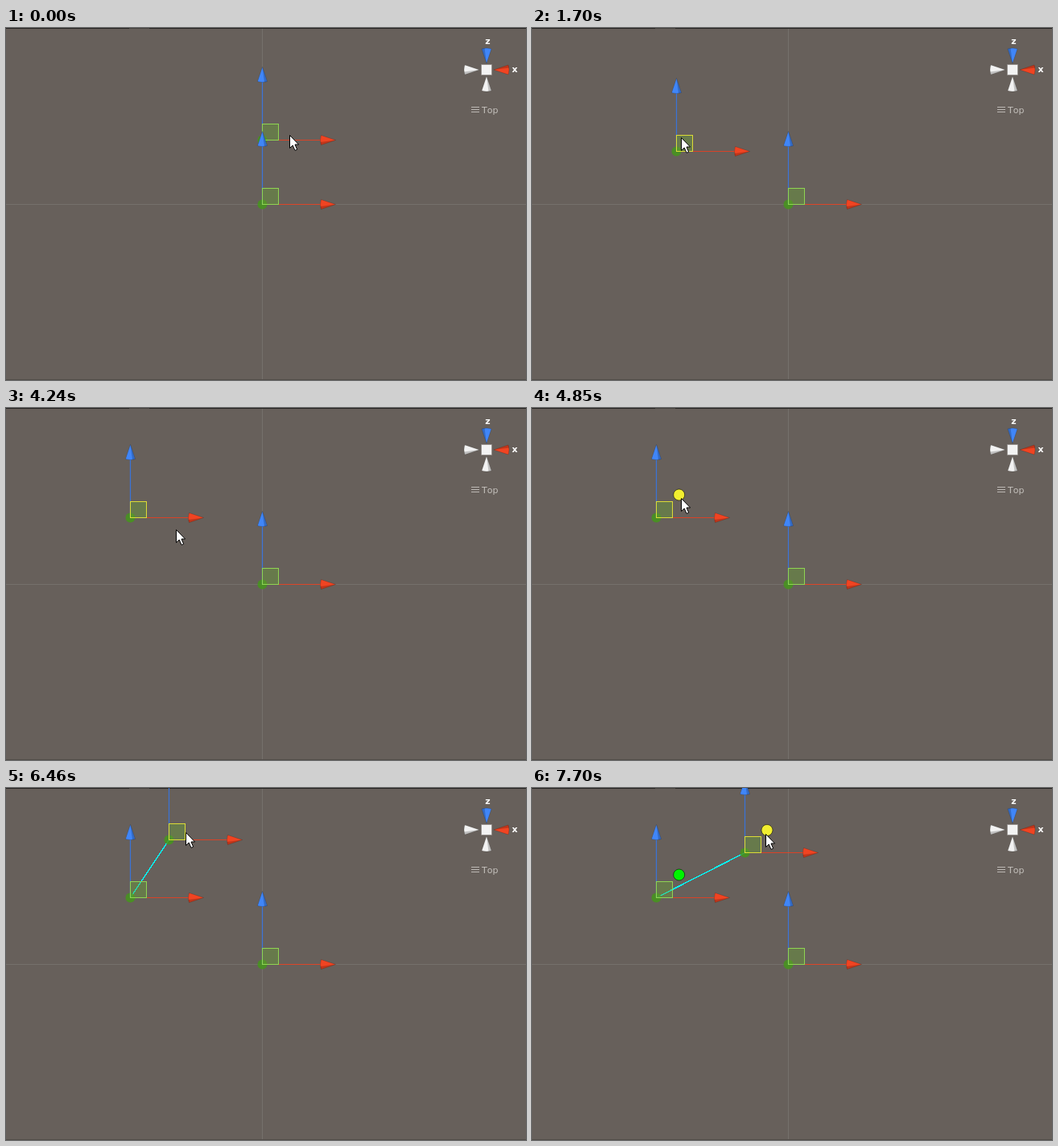
An HTML page that plays this animation: 646x438 px, repeating every 8 s.

```html
<!DOCTYPE html>
<html lang="en">
<head>
<meta charset="utf-8">
<title>Scene handles</title>
<style>
  html, body { margin: 0; width: 646px; height: 438px; overflow: hidden; background: #67605b; }
  svg { display: block; }
  text { font: 11px "DejaVu Sans", Verdana, sans-serif; font-kerning: none; }
  .crisp { shape-rendering: crispEdges; }
  .label { font-weight: bold; fill: #fff; text-anchor: middle; }
  .handle { color: #8fd552; }
  .handle.active { color: #dcdc36; }
  .blue { color: #4086f8; }
  .red { color: #f04422; }
  .white { color: #f2f2f2; }
</style>
</head>
<body>
<svg width="646" height="438" viewBox="0 0 646 438">
  <defs>
    <!-- cone pointing up, tip at the origin -->
    <g id="cone">
      <path d="M0 0L-6 18Q0 20 6 18Z" fill="currentColor"/>
      <path d="M0 0L2.5 19Q5 18.6 6 18Z" opacity=".2"/>
      <path d="M0 0L-6 18Q0 20 6 18Z" fill="none" stroke="#000" stroke-opacity=".25" stroke-width=".6"/>
    </g>
    <g id="handle">
      <circle r="6" fill="#45961c" opacity=".85"/>
      <path d="M0 0H73" stroke="#ee3f1e" stroke-width="1.2" opacity=".85"/>
      <path d="M0 0V-73" stroke="#3377ee" stroke-width="1.2" opacity=".85"/>
      <rect class="crisp" y="-20" width="20" height="20" fill="#66a032" fill-opacity=".4" stroke="currentColor"/>
      <use href="#cone" class="blue" transform="translate(0 -91)"/>
      <use href="#cone" class="red" transform="translate(91 0) rotate(90)"/>
    </g>
  </defs>

  <rect width="646" height="438" fill="#67605b"/>
  <g class="crisp">
    <path d="M0 219.5H646M318.5 0V438" stroke="#75706b"/>
    <path d="M0 .5H646" stroke="#262422"/>
    <path d="M153 .5H178" stroke="#45413e"/>
    <path d="M0 437.5H646" stroke="#524d49"/>
  </g>

  <g id="view">
    <use href="#cone" class="blue" transform="translate(597 44) rotate(180)"/>
    <use href="#cone" class="red" transform="translate(606 52) rotate(-90)"/>
    <use href="#cone" class="white" transform="translate(588 52) rotate(90)"/>
    <use href="#cone" class="white" transform="translate(597 60)"/>
    <rect x="590.5" y="45.5" width="13" height="13" fill="#f3f3f3" stroke="#8d8884" stroke-width=".7"/>
    <text class="label" x="598.5" y="20">z</text>
    <text class="label" x="632" y="55">x</text>
    <path class="crisp" d="M578 98.5h10m-10 3h10m-10 3h10" stroke="#bdb9b5"/>
    <text x="591" y="106" fill="#c4c0bc">Top</text>
  </g>

  <path id="link" class="crisp" stroke="#0ff" stroke-width="1.5"/>
  <use id="b" class="handle" href="#handle"/>
  <use class="handle" href="#handle" transform="translate(318.5 219.5)"/>
  <use id="c" class="handle" href="#handle"/>
  <g stroke="#000" stroke-opacity=".55">
    <circle id="knobB" cx="182.7" cy="108" r="7"/>
    <circle id="knobC" cx="292" cy="52.5" r="7" fill="#f2ee30"/>
  </g>
  <path id="cursor" d="M.5 .5V16.5L4.2 13L7 19.4L9.7 18.2L7 12H11.6Z" fill="#fff" stroke="#000"/>
</svg>
<script>
  const LOOP = 8000, TICK = 88;
  const el = id => document.getElementById(id);
  const [b, c, link, knobB, knobC, cursor] = ["b", "c", "link", "knobB", "knobC", "cursor"].map(el);

  // All times below are ticks, the rate at which the picture refreshes.
  const ramp = (n, from, to) => Math.min(Math.max((n - from) / (to - from), 0), 1);
  const arc = (n, from, to) => Math.sin(Math.PI * ramp(n, from, to));
  const slide = (n, from, to, dx, dy) => [dx, dy].map(d => d * ramp(n, from, to));
  const sum = (...vectors) => [0, 1].map(i => vectors.reduce((total, v) => total + v[i], 0));

  const dragB = n => sum(
    slide(n, 6, 14, -122, 25), [0, -27 * arc(n, 6, 14)],
    slide(n, 17, 22, -42, -28));

  const dragC = n => sum(slide(n, 69, 78, 109, 21), slide(n, 78, 82, 1, 4));

  // The pointer leads whatever it drags by half a tick.
  const pointer = n => sum(
    [352, 133],
    slide(n, 0, 2, -24, -8),
    dragB(n + .5),
    slide(n, 24, 28, 50, 40),
    slide(n, 47, 51, -12, -46),
    slide(n, 52, 55, -17, -4),
    slide(n, 56, 65, -4, -43), [0, 58 * arc(n, 56, 65)],
    slide(n, 65, 68, -13, -25),
    dragC(n + .5),
    slide(n, 81, 87, 12, -12));

  const show = (node, on) => { node.style.display = on ? "" : "none"; };

  function move(node, point, shift = 0) {
    const [x, y] = point.map(v => Math.round(v) + shift);
    node.setAttribute("transform", `translate(${x} ${y})`);
    return `${x} ${y}`;
  }

  function draw(n) {
    const linked = n >= 57, done = n >= 84;
    const start = move(b, sum([318, 139], dragB(n)), .5);
    const end = move(c, sum([154, 55], dragC(n)), .5);
    move(cursor, pointer(n));
    link.setAttribute("d", `M${start}L${end}`);

    b.classList.toggle("active", n >= 7 && !linked);
    c.classList.toggle("active", n >= 70);
    show(c, linked);
    show(link, linked);
    show(knobB, n >= 50 && !linked || done);
    show(knobC, done);
    knobB.setAttribute("fill", done ? "#00f400" : "#f2ee30");
  }

  const began = performance.now();
  function frame() {
    draw(Math.floor((performance.now() - began) % LOOP / TICK));
    requestAnimationFrame(frame);
  }
  frame();
</script>
</body>
</html>
```
